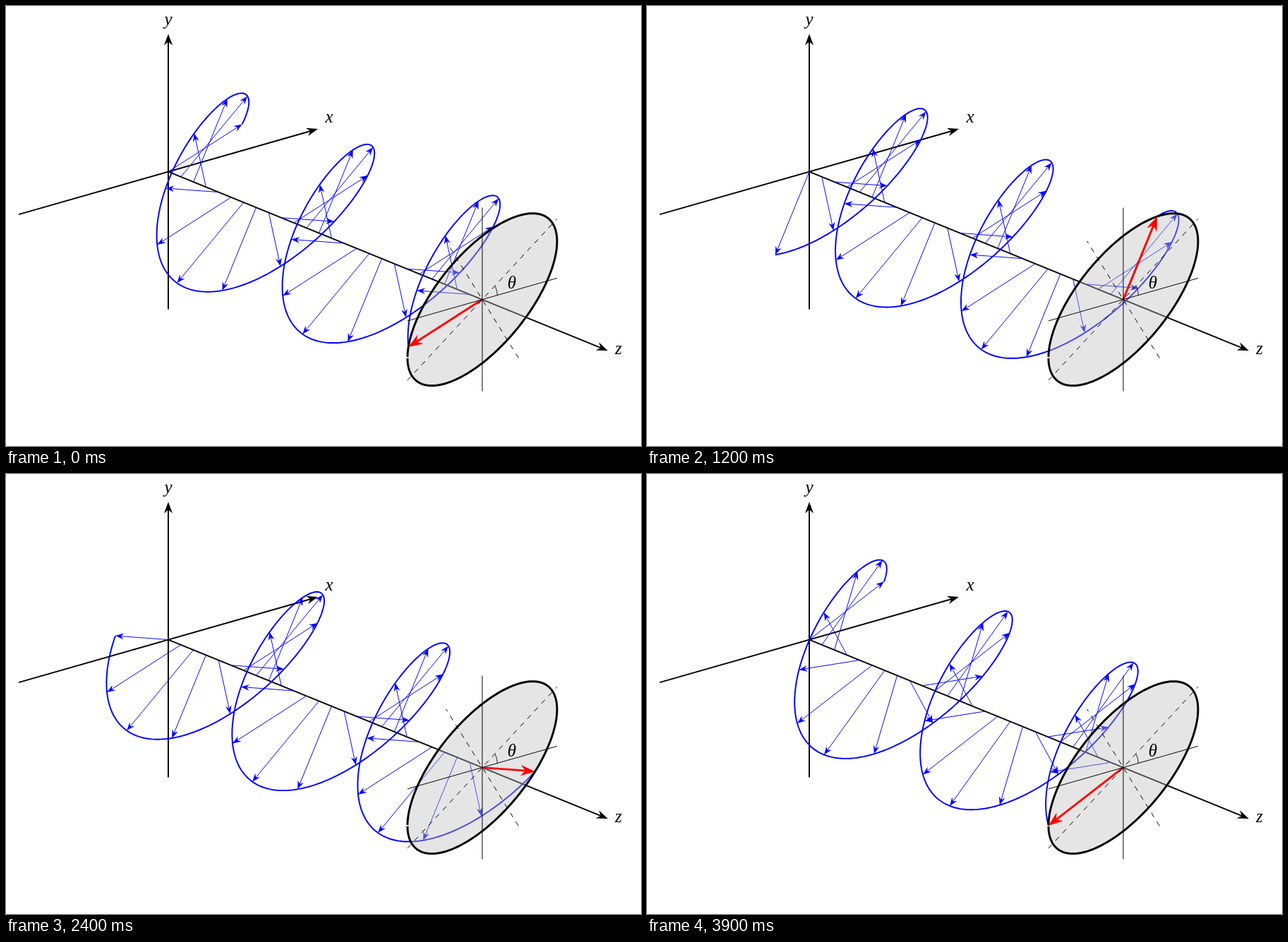
An HTML page with a canvas for the animation above (4 s loop, 900x623 px).

```html
<!DOCTYPE html>
<html lang="en">
<head>
<meta charset="utf-8">
<title>Elliptical polarisation</title>
<style>
  html, body { margin: 0; width: 100%; height: 100%; overflow: hidden; background: #fff; }
  canvas { display: block; }
</style>
</head>
<body>
<canvas id="stage" width="900" height="623"></canvas>
<script>
const ctx = document.getElementById('stage').getContext('2d');
const RAD = Math.PI / 180;
const PT = 2.45;
const THIN = 0.4 * PT, THICK = 0.8 * PT, HEAVY = 1.2 * PT;
const ARROWS = 25;
const STEP_MS = 100, STEPS = 40;

const origin = [230, 234.6];
const disc = [675, 415.6];
const ampY = 0.8, lag = 60;
const tilt = Math.atan2(2 * ampY * Math.cos(lag * RAD), 1 - ampY * ampY) / 2;

// Oblique projection of the transverse plane at a given centre
const project = ([cx, cy], x, y) => [cx + 106 * x, cy - 30.25 * x - 130 * y];
const field = (centre, deg) =>
  project(centre, Math.cos(deg * RAD), ampY * Math.cos((deg - lag) * RAD));
const onAxis = k => origin.map((o, i) => o + (disc[i] - o) * k / ARROWS);

function trace(points) {
  ctx.beginPath();
  points.forEach(p => ctx.lineTo(...p));
}

function stroke(points, width, color = '#000', dash = []) {
  trace(points);
  ctx.lineWidth = width;
  ctx.strokeStyle = color;
  ctx.setLineDash(dash);
  ctx.stroke();
}

function arrow(from, to, width, color = '#000') {
  const length = 3 * PT + 4.5 * width;
  const half = length * 0.375, notch = length * 0.675;
  const dx = to[0] - from[0], dy = to[1] - from[1];
  const dist = Math.hypot(dx, dy);
  const ux = dx / dist, uy = dy / dist;
  const at = (back, side) => [to[0] - ux * back - uy * side, to[1] - uy * back + ux * side];
  stroke([from, at(notch - 0.5, 0)], width, color);
  trace([to, at(length, half), at(notch, 0), at(length, -half)]);
  ctx.fillStyle = color;
  ctx.fill();
}

function sample(count, fn) {
  return Array.from({ length: count + 1 }, (_, i) => fn(i / count));
}

function label(text, x, baseline) {
  ctx.font = 'italic 25px "Liberation Serif", "Times New Roman", serif';
  ctx.textAlign = 'center';
  ctx.fillStyle = '#000';
  ctx.fillText(text, x, baseline);
}

function drawAxes() {
  arrow(project(origin, -2, 0), project(origin, 2, 0), THICK);
  arrow(project(origin, 0, -1.5), project(origin, 0, 1.5), THICK);
  arrow(origin, onAxis(35), THICK);
  label('x', 458, 165);
  label('y', 230, 27);
  label('z', 868, 493);
}

function drawWave(phase) {
  const tip = k => field(onAxis(k), phase + 36 * k);
  for (let k = 0; k < ARROWS; k++) arrow(onAxis(k), tip(k), THIN, '#00f');
  stroke(sample(500, u => tip(u * ARROWS)), THICK, '#00f');
}

function drawDisc(phase) {
  const rim = sample(240, u => field(disc, 180.6 + 358.8 * u));
  trace(rim);
  ctx.fillStyle = 'rgba(191, 191, 191, 0.4)';
  ctx.fill();
  stroke(rim, HEAVY);

  arrow(disc, field(disc, phase + 36 * ARROWS), HEAVY, '#f00');

  const diameter = (x, y, dash) =>
    stroke([project(disc, -x, -y), project(disc, x, y)], THIN, '#000', dash);
  const slope = Math.tan(tilt), dashes = [3 * PT, 3 * PT];
  diameter(1, 0);
  diameter(0, 1);
  diameter(1, slope, dashes);
  diameter(-0.75 * slope, 0.75, dashes);

  stroke(sample(20, u => project(disc, 0.2 * Math.cos(tilt * u), 0.2 * Math.sin(tilt * u))), THIN);
  label('θ', 717, 400);
}

function render() {
  const step = Math.floor(performance.now() / STEP_MS) % STEPS;
  const phase = -9 * (step + 1);
  ctx.clearRect(0, 0, 900, 623);
  drawAxes();
  drawWave(phase);
  drawDisc(phase);
  requestAnimationFrame(render);
}
render();
</script>
</body>
</html>
```
